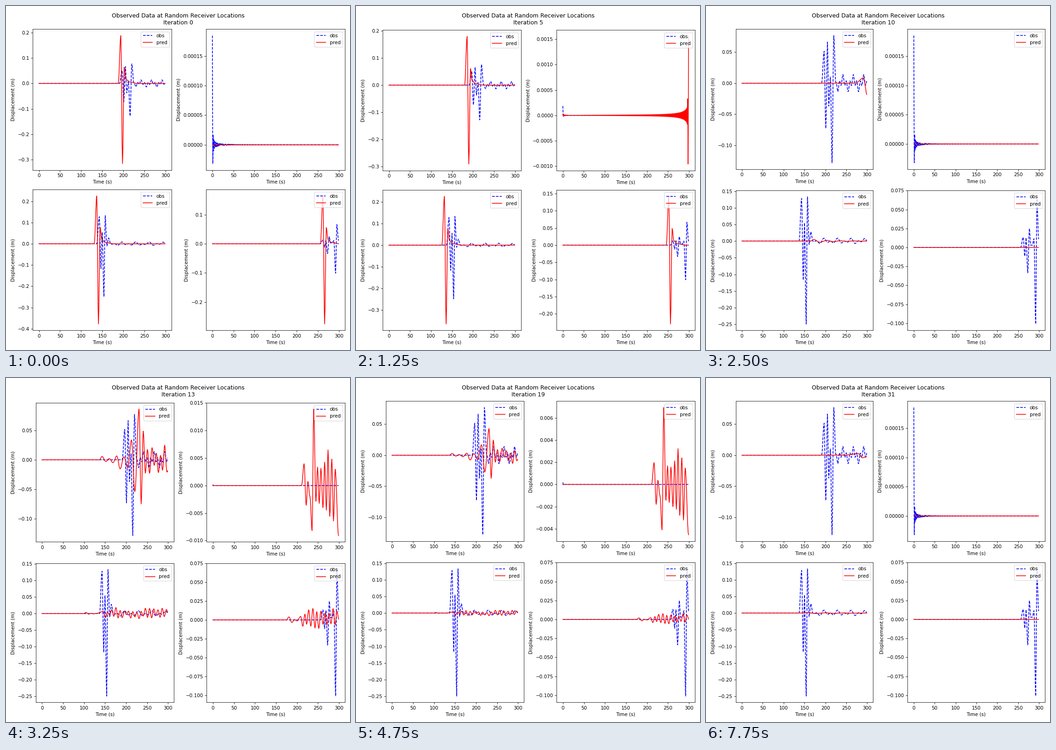
Recreate the animation shown at these times as a matplotlib script. Size 748 by 748 pixels, loop 8 s.

```python
import numpy as np
import matplotlib.pyplot as plt
from matplotlib.animation import FuncAnimation

INCHES, DPI = 10, 74.8
FRAMES, INTERVAL = 32, 250
T = np.arange(300)
ZERO = np.zeros(T.size)
MM = 1e-3
rng = np.random.default_rng(7)


def wave(points):
    """Half-cosine curve through (time, value) turning points."""
    points = [(0, 0), (points[0][0] - 6, 0), *points, (points[-1][0] + 5, 0)]
    ts, vs = np.array(points, float).T
    i = np.clip(np.searchsorted(ts, T, side="right") - 1, 0, len(ts) - 2)
    u = np.clip((T - ts[i]) / (ts[i + 1] - ts[i]), 0, 1)
    return vs[i] + (vs[i + 1] - vs[i]) * (1 - np.cos(np.pi * u)) / 2


def swings(first, gap, heights):
    """Turning points at an even spacing."""
    return [(round(first + gap * k), h) for k, h in enumerate(heights)]


def rough(count, low, high):
    """Random heights of alternating sign."""
    return list(rng.uniform(low, high, count) * (-1.0) ** np.arange(count))


def fade_in(start, length=8):
    return np.clip((T - start) / length, 0, 1)


def beat(start, centre, amp, slow, fast):
    """Two mixed tones that are in step at the centre."""
    u = 2 * np.pi * (T - centre)
    return amp * fade_in(start) * (np.cos(u / slow) + np.cos(u / fast))


def damped(start, amp, period, decay):
    u = T - start
    return (amp * fade_in(start - 8) * np.cos(2 * np.pi * u / period)
            * np.exp(-np.maximum(u, 0) / decay))


def spike():
    y = 3.2e-5 * (-1.0) ** T / np.maximum(T, 1)
    y[0] = 1.85e-4
    return y


def ring(amp):
    """Alternating ripple that grows towards the end of the record."""
    k = 299 - T
    return amp * (-1.0) ** k * (1 / (k + 6) + .87 * np.exp(-.56 * k ** 2)
                                - .1 / (T + 6))


def pulse(time, peak, ratio):
    t = round(time)
    swing = [(0, 1), (4, -ratio), (8, .34), (12, .09), (20, .03), (40, 0)]
    return wave([(t + dt, peak * h) for dt, h in swing])


# Panels in order: top left, top right, bottom left, bottom right.
OBSERVED = [
    MM * (wave(swings(197, 3.8, [51.5, -73, 66.3, -37, 10, -128.4, 76.8]))
          + beat(222, 242, 7, 25, 8.3)),
    spike(),
    MM * (wave(swings(143, 3.6, [128, -117, 55, -249, 133, -10, 28]))
          + beat(166, 229, 4.5, 31, 16.5)),
    MM * wave(swings(262, 3.7, [13.4, -11.6, 12.8, -33.5, 25, 3, 3, 11.6,
                                -101, 66.8, 11])),
]

DELAYED = [
    MM * wave([(272, 0), (291, 8.5), (300, -19)]),
    ZERO,
    MM * damped(172, 5, 32, 40),
    ZERO,
]

SCATTERED = [
    MM * wave(swings(143, 8.7, [11, -6, 4, -10, 13, -31, 10, -27, 67, -108])
              + swings(231, 5.1, [171.5, -149.5, 97, -45]
                       + rough(10, 10, 50))),
    MM * wave(swings(217, 4.7, [7.9, -7.2, 1.5, -4, -16.4, 27.8, -5.7])
              + swings(249, 4.2, rough(11, 4, 13)) + [(299, -18.2)]),
    MM * wave(swings(105, 6, [7, -3, 1.5, -1.5, 1])
              + swings(146, 5, rough(31, 8, 36))),
    MM * wave(swings(181, 6.5, [8, -7, 1, -2.5])
              + swings(209, 4.8, rough(19, 8, 31))),
]

SETTLED = [
    MM * wave([(244, 0), (279, 2.5), (289, -4.2), (299, -2.5)]),
    ZERO,
    MM * damped(156, 1.5, 44, 90),
    ZERO,
]


def early(i):
    """Pulses that ease to earlier arrivals while the ripple builds up."""
    e = (1 - i / 5) ** 1.6
    ratio = 1.62 + .055 * e
    return [
        pulse(186 + 8 * e, .18 + .008 * e ** 2, ratio),
        ring(np.interp(i, [0, 3, 5], [0, -1.6e-4, 1.5e-3])),
        pulse(132 + 5 * e, .2255, ratio),
        pulse(252 + 10 * e, .142 + .0225 * e ** 2, ratio),
    ]


def blend(a, b, w):
    return [(1 - w) * p + w * q for p, q in zip(a, b)]


def predicted(i):
    if i <= 5:
        return early(i)
    if i <= 10:
        return blend(early(5), DELAYED, (i - 5) / 5)
    if i <= 16:
        return blend(DELAYED, SCATTERED, (i - 10) / 6)
    return blend(SCATTERED, SETTLED, min(1, (i - 16) / 4))


fig, grid = plt.subplots(2, 2, figsize=(INCHES, INCHES), dpi=DPI)
axes = grid.ravel()
lines = []
for ax, obs in zip(axes, OBSERVED):
    ax.plot(T, obs, "b--", label="obs")
    lines += ax.plot(T, ZERO, "r-", label="pred")
    ax.set(xlabel="Time (s)", ylabel="Displacement (m)")
    ax.legend(loc="upper right")


def update(i):
    for ax, line, y in zip(axes, lines, predicted(i)):
        line.set_ydata(y)
        ax.relim()
        ax.autoscale_view()
    fig.suptitle(f"Observed Data at Random Receiver Locations\nIteration {i}")
    fig.tight_layout()
    return lines


anim = FuncAnimation(fig, update, frames=FRAMES, interval=INTERVAL,
                     init_func=lambda: lines, repeat=True, repeat_delay=0)
plt.show()
```
